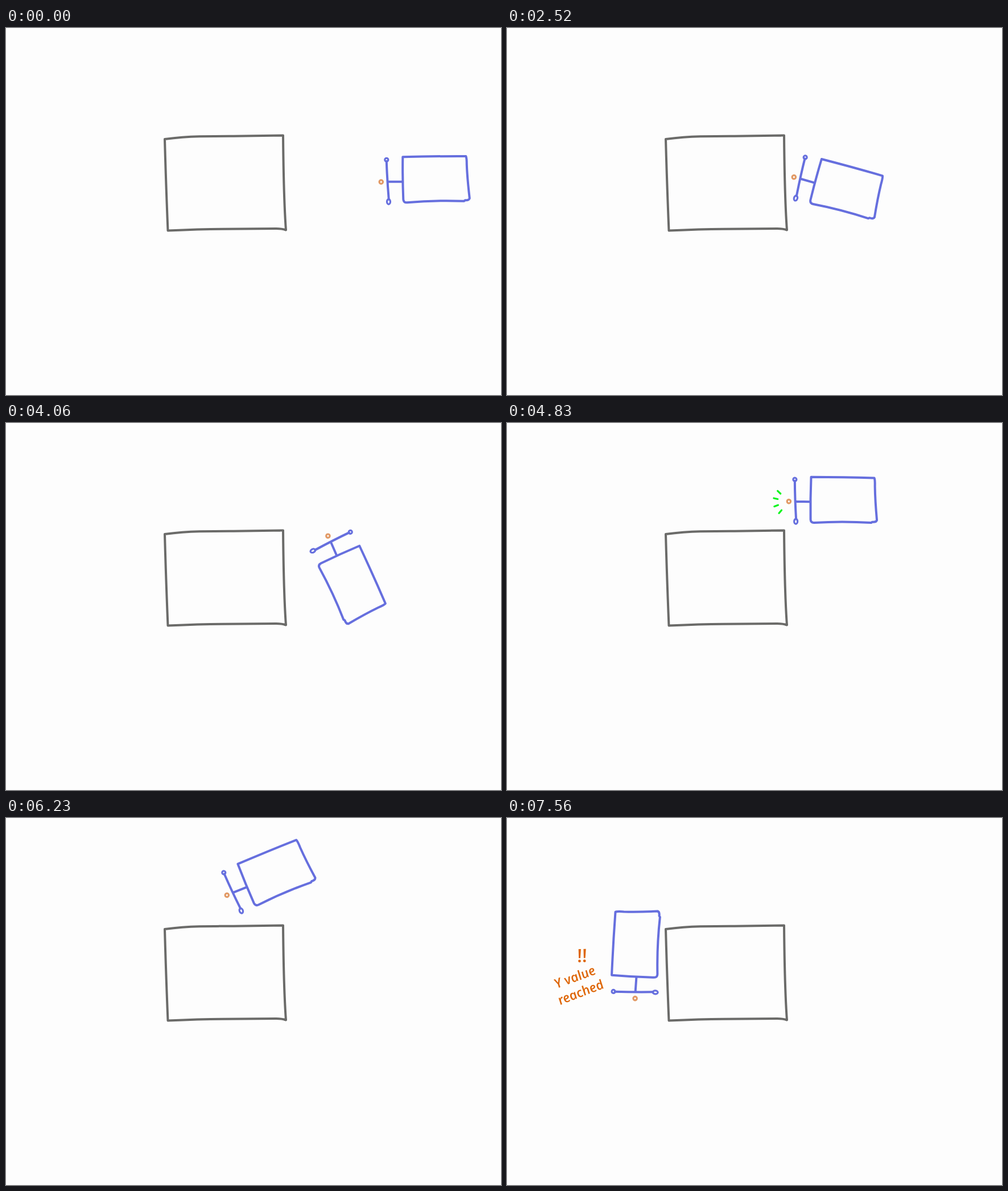
An HTML page that plays this animation: 870x644 px, repeating every 8 s.

```html
<!DOCTYPE html>
<html lang="en">
<head>
<meta charset="utf-8">
<title>Wall-following robot</title>
<style>
html, body { margin: 0; width: 100%; height: 100%; overflow: hidden; background: #fdfdfd; }
svg { display: block; width: 100%; height: 100%; fill: none; stroke-linecap: round; stroke-linejoin: round; }
text { font: italic 600 27px "Open Sans", "Noto Sans", sans-serif; }
</style>
</head>
<body>
<svg id="stage" viewBox="0 0 870 644">
  <path stroke="#6b6b69" stroke-width="4" d="M279 195Q310 191 340 190.3T400 189.7L487 188.5Q488 300 492 354.5Q485 352 475 352L380 352.7Q340 353 284.5 355.5Q281 270 279 195Z"/>
  <g id="robot" stroke="#666fde" stroke-width="4">
    <path d="M-57.5-38.5Q0-40 53.5-39.8Q55-37 55-25Q56 0 60 34Q59 38 52 37.5L50 39Q0 37-50 41.5Q-56 42-56.5 36Q-58 0-57.5-38.5Z"/>
    <path d="M-83 5L-58 5M-86-31Q-85 0-82 36"/>
    <circle cx="-86" cy="-33.5" r="3" stroke-width="3.2"/>
    <ellipse cx="-82.3" cy="40" rx="3" ry="4.5" stroke-width="3.2"/>
    <g id="sensor" transform="translate(-95.5 5.3)" stroke-width="3.2">
      <circle r="3.2" stroke="#e29a66"/>
    </g>
  </g>
</svg>
<script>
const LOOP = 8000, STEP = 70;
const RED = '#fa1c12', GREEN = '#06f51c', BLACK = '#080808', ORANGE = '#de6607';
const stage = document.getElementById('stage');
const robot = document.getElementById('robot');
const sensor = document.getElementById('sensor');
const timed = [];

function add(parent, tag, attributes, from, to) {
  const el = parent.appendChild(document.createElementNS(stage.namespaceURI, tag));
  for (const name in attributes) el.setAttribute(name, attributes[name]);
  timed.push({ el, from, to });
  return el;
}

// The skew turns the slanted italic into an upright hand
function write(text, x, y, angle, fill, from, to, size = 27) {
  const transform = `translate(${x} ${y}) rotate(${angle}) skewX(9)`;
  add(stage, 'text', { transform, fill, style: `font-size:${size}px` }, from, to).textContent = text;
}

// Four dashes fanning out in front of the sensor
function flash(stroke, radius, tilt, spacing, from, to) {
  let d = '';
  for (let i = -1.5; i <= 1.5; i++) {
    const a = (tilt + i * spacing) * Math.PI / 180;
    for (const r of [radius, radius + 7])
      d += `${r === radius ? 'M' : 'L'}${-r * Math.cos(a)} ${-r * Math.sin(a)}`;
  }
  add(sensor, 'path', { d, stroke }, from, to);
}

write('Does this have', 515, 141, -7, BLACK, 490, 2520);
write('coloured tape?', 523, 163, -6, BLACK, 490, 2520);
write('NO!', 590, 192, -1, '#9c1c20', 1470, 2520, 22);
write('Reverse and turn right', 540, 347, -1, BLACK, 1820, 2520, 25);
write('!!', 125, 253, -2, ORANGE, 7560, LOOP, 32);
write('Y value', 88, 299, -20, ORANGE, 7560, LOOP, 23);
write('reached', 94, 328, -21, ORANGE, 7560, LOOP, 23);

flash(RED, 15, 5, 40, 490, 2520);
flash(RED, 15, 5, 40, 3290, 3850);
flash(GREEN, 20, -5, 31, 4830, 5180);
flash(RED, 13, -5, 39, 5600, 6020);
flash(GREEN, 20, -5, 31, 6860, 7280);

// Each move runs from the pose before it; a higher turn power delays the rotation
const START = { x: 754.8, y: 264.8, angle: 0 };
const MOVES = [
  { at: 0, steps: 7, x: 601.5, y: 269.8, angle: 0 },
  { at: 2450, steps: 5, x: 582, y: 335, angle: 80 },
  { at: 2800, steps: 7, x: 597, y: 210, angle: -8 },
  { at: 3780, steps: 5, x: 612, y: 302, angle: 85 },
  { at: 4130, steps: 10, x: 591, y: 134.8, angle: 1.5 },
  { at: 5110, steps: 7, x: 427.5, y: 88.3, angle: -88.3, turn: 3 },
  { at: 5950, steps: 5, x: 487, y: 97, angle: -5 },
  { at: 6300, steps: 6, x: 283, y: 99, angle: -37.8, turn: 3 },
  { at: 6720, steps: 2, x: 226, y: 85, angle: -86 },
  { at: 7210, steps: 5, x: 226.5, y: 221, angle: -86 }
];

function poseAt(t) {
  let { x, y, angle } = START;
  for (const move of MOVES) {
    if (t < move.at) break;
    const k = Math.min(1, (t - move.at) / (move.steps * STEP));
    x += (move.x - x) * k;
    y += (move.y - y) * k;
    angle += (move.angle - angle) * k ** (move.turn || 1);
  }
  return { x, y, angle };
}

function draw() {
  const t = Math.floor((performance.now() % LOOP) / STEP) * STEP;
  const { x, y, angle } = poseAt(t);
  robot.setAttribute('transform', `translate(${x} ${y}) rotate(${angle})`);
  for (const { el, from, to } of timed)
    el.style.display = t >= from && t < to ? '' : 'none';
  requestAnimationFrame(draw);
}
draw();
</script>
</body>
</html>
```
